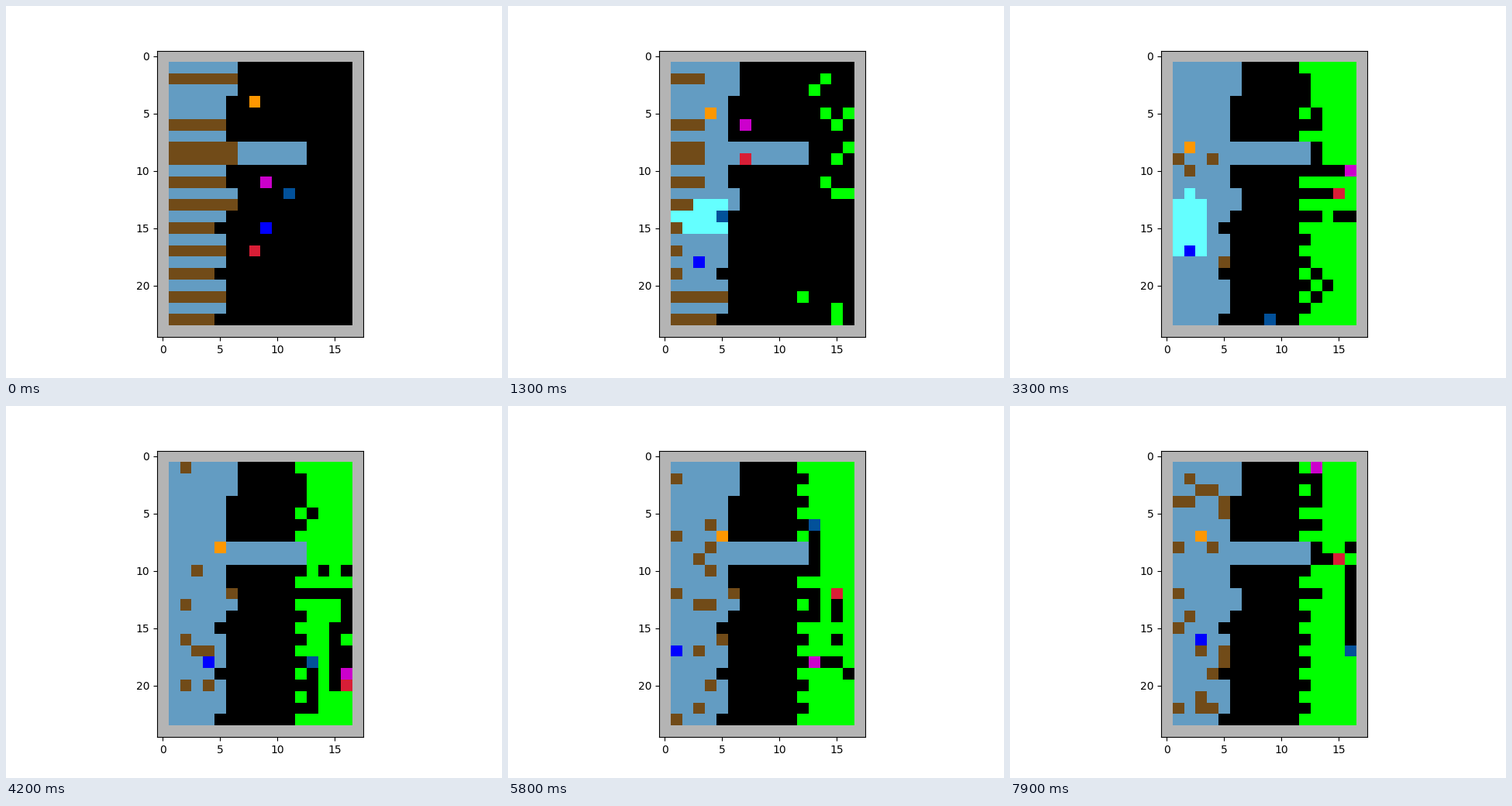
A matplotlib script that plays this animation: 640x480 px, repeating every 8000 ms.

```python
import numpy as np
import matplotlib.pyplot as plt
from matplotlib.animation import FuncAnimation

ROWS, COLS, STEPS = 25, 18, 80
BLACK, WALL = (0, 0, 0), (180, 180, 180)
WATER, WASTE = (99, 156, 194), (113, 75, 24)
APPLE, BEAM = (0, 255, 0), (100, 255, 255)
LEFT, RIGHT, UP, DOWN = (0, -1), (0, 1), (-1, 0), (1, 0)
REACH = 5

rng = np.random.default_rng(4)
row, col = np.indices((ROWS, COLS))
inside = (row % (ROWS - 1) > 0) & (col % (COLS - 1) > 0)

# Static ground: river, stream and orchard between the walls
width = np.where(np.isin(row, (1, 2, 3, 8, 9, 12, 13)), 6, 5)
width[15::4] = 4
river = inside & (col <= width)
orchard = inside & (col >= np.where((row % 2 == 1) & (row != 9), 12, 13))
ground = np.full((ROWS, COLS, 3), WALL, np.uint8)
ground[inside] = BLACK
ground[river] = WATER
ground[8:10, 7:13] = WATER

# Agents: colour and waypoints (step, row, column)
AGENTS = {
    "blue": ((0, 0, 255), [(0, 15, 9), (13, 18, 3), (21, 18, 3), (33, 17, 2),
                           (42, 18, 4), (58, 17, 1), (79, 16, 3)]),
    "navy": ((2, 81, 154), [(0, 12, 11), (13, 14, 5), (21, 19, 5), (33, 23, 9),
                            (38, 22, 13), (42, 18, 13), (58, 6, 13),
                            (66, 6, 16), (79, 17, 16)]),
    "pink": ((204, 0, 204), [(0, 11, 9), (13, 6, 7), (21, 6, 13), (33, 10, 16),
                             (42, 19, 16), (58, 18, 13), (79, 1, 13)]),
    "red": ((216, 30, 54), [(0, 17, 8), (13, 9, 7), (21, 8, 12), (33, 12, 15),
                            (42, 20, 16), (46, 18, 15), (58, 12, 15),
                            (72, 8, 13), (79, 9, 15)]),
    "orange": ((254, 151, 0), [(0, 4, 8), (13, 5, 4), (21, 6, 2), (33, 8, 2),
                               (42, 8, 5), (58, 7, 5), (79, 7, 3)]),
}

# Cleaning shots: step, agent, heading
SHOTS = [(7, "orange", LEFT), (8, "orange", UP), (9, "blue", LEFT),
         (13, "navy", LEFT), (16, "navy", LEFT), (18, "orange", UP),
         (21, "orange", UP), (21, "blue", RIGHT), (25, "orange", DOWN),
         (29, "blue", UP), (33, "blue", UP)]


def walk(points):
    """Evenly timed single steps, vertical moves before horizontal ones."""
    path = [points[0][1:]]
    for (t0, r0, c0), (t1, r1, c1) in zip(points, points[1:]):
        dr, dc = r1 - r0, c1 - c0
        for t in range(1, t1 - t0 + 1):
            done = round((abs(dr) + abs(dc)) * t / (t1 - t0))
            down = min(done, abs(dr))
            path.append((r0 + down * np.sign(dr),
                         c0 + (done - down) * np.sign(dc)))
    return path


PATHS = {name: walk(points) for name, (_, points) in AGENTS.items()}

# Thick sludge: a first cleaning works inwards from the bank and leaves
# a strip by the wall, which goes in a second pass
sludge = river & ((row % 2 == 1) & (row > 10) | np.isin(row, (2, 6, 8, 9)))
keep = np.where(row > 20, 5, np.clip((20 - row) // 3, 1, 3))
first = 4 + 1.5 * (6 - col) + rng.uniform(0, 2, river.shape)
second = rng.uniform(14, 20, river.shape)
second[8:14] += 9
second[20:] += 4
cleared = np.where(col > keep, first, second)

# Loose waste: spots that stay longer as the cleaning dies down
cells = np.argwhere(river)
spots = cells[rng.integers(len(cells), size=66)]
born = rng.uniform(6, STEPS, len(spots))
gone = born * rng.uniform(1.2, 1.6, len(spots))


def grow_apples():
    """Apples ripen gradually, are eaten on contact and grow back."""
    ready = 10 + rng.gamma(2, 6, orchard.shape)
    for t in range(STEPS):
        for path in PATHS.values():
            ready[path[t]] = max(ready[path[t]], t + rng.integers(2, 18))
        yield orchard & (ready <= t)


apples = list(grow_apples())


def beam_cells(t, pos, heading):
    """Three lanes, each stopped by sludge or by an agent it hits."""
    head = np.array(heading)
    across = np.abs(head[::-1])
    others = {path[t] for path in PATHS.values()} - {pos}
    for side in (-1, 0, 1):
        start = 1 if side == 0 else 0
        for k in range(start, start + REACH):
            cell = tuple(pos + side * across + k * head)
            if not inside[cell] or (sludge[cell] and cleared[cell] > t):
                break
            yield cell
            if cell in others:
                break


def render(t):
    img = ground.copy()
    img[sludge & (cleared > t)] = WASTE
    r, c = spots[(born <= t) & (t < gone)].T
    img[r, c] = WASTE
    img[apples[t]] = APPLE
    for name, (color, _) in AGENTS.items():
        img[PATHS[name][t]] = color
    for step, name, heading in SHOTS:
        if step == t:
            for cell in beam_cells(t, PATHS[name][t], heading):
                img[cell] = BEAM
    return img


fig, ax = plt.subplots(figsize=(6.4, 4.8), dpi=100)
view = ax.imshow(render(0))


def update(t):
    view.set_data(render(t))
    return (view,)


anim = FuncAnimation(fig, update, frames=STEPS, interval=100, repeat=True,
                     repeat_delay=0)
plt.show()
```
